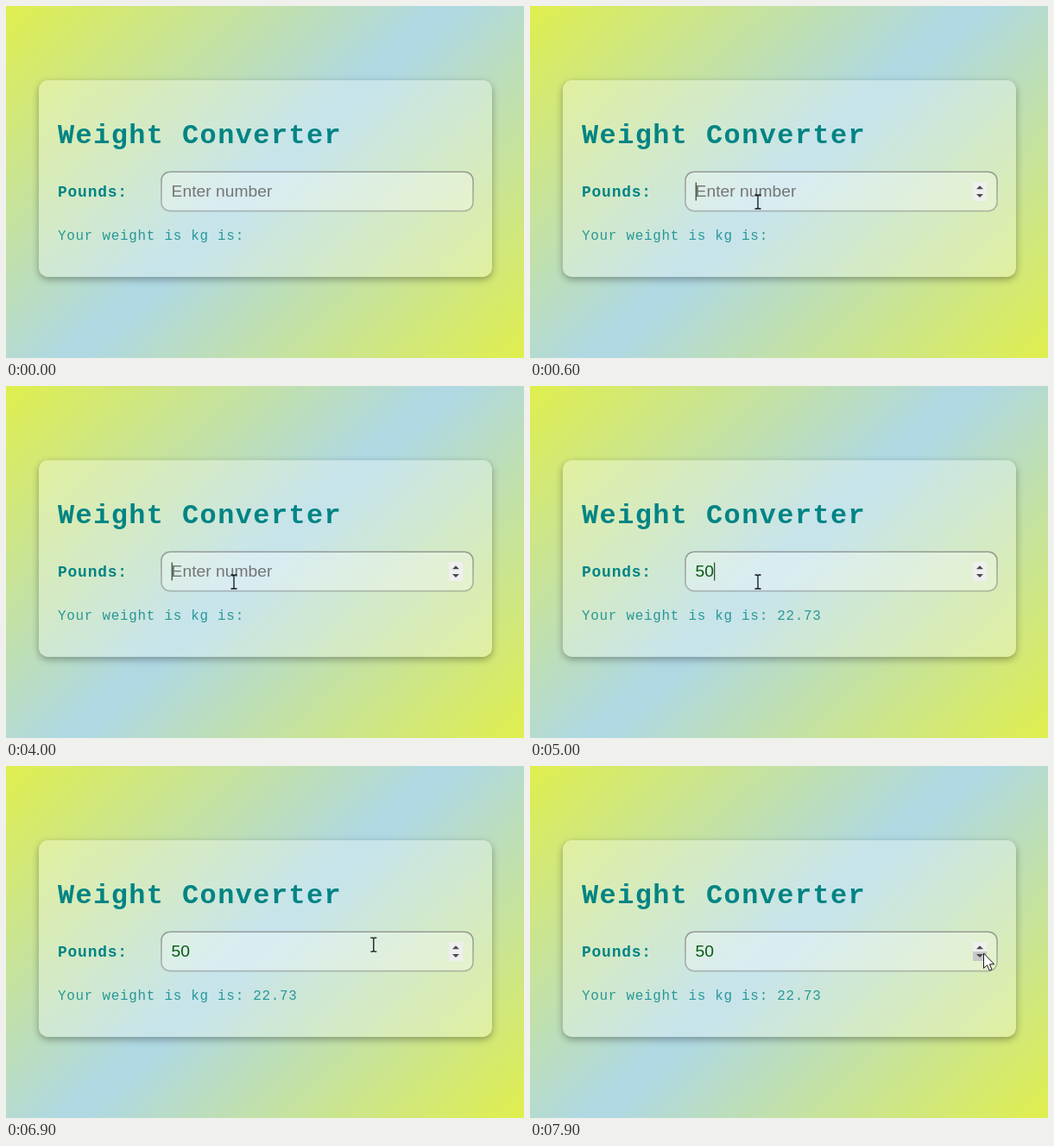
These frames come from a looping animation (600 by 408 pixels, 8 s). An HTML page:

```html
<!DOCTYPE html>
<html lang="en">
<head>
<meta charset="utf-8">
<title>Weight Converter</title>
<style>
html, body { margin: 0; width: 100%; height: 100%; overflow: hidden; }
body { position: relative; background: linear-gradient(137deg, #dfee50 1%, #afd8e2 48%, #afd8e2 51%, #dfee50 99%); }
.card {
  position: absolute; left: 38px; top: 85.5px; width: 525px; height: 228px;
  border-radius: 10.7px; background: rgba(255, 255, 255, .3);
  box-shadow: 0 3px 8px rgba(0, 0, 0, .33);
}
svg { position: absolute; left: 0; top: 0; width: 600px; height: 408px; }
text { white-space: pre; }
.mono { font-family: "Liberation Mono", "Courier New", monospace; fill: #008484; letter-spacing: .045em; }
.bold { font-weight: 700; }
.sans { font-family: "Liberation Sans", Arial, sans-serif; font-size: 19.28px; }
</style>
</head>
<body>
<div class="card"></div>
<svg viewBox="0 0 600 408">
  <linearGradient id="edge" x2="0" y2="1">
    <stop stop-color="#767676" stop-opacity=".68"/>
    <stop offset="1" stop-color="#767676" stop-opacity=".45"/>
  </linearGradient>
  <text class="mono bold" x="60" y="159" font-size="31.9">Weight Converter</text>
  <text class="mono bold" x="60" y="221" font-size="17.93">Pounds:</text>
  <text class="mono" id="result" x="60" y="270.5" font-size="15.94" opacity=".8"></text>

  <rect x="180" y="192.2" width="361" height="45.4" rx="10" fill="#fff" fill-opacity=".3"
        stroke="url(#edge)" stroke-width="1.6"/>
  <text class="sans" id="field" x="191.6" y="221"></text>
  <rect id="caret" y="204.5" width="1.1" height="21" fill="#123c12"/>

  <g id="spinner">
    <rect x="513" y="204" width="16" height="22" fill="#efefef"/>
    <rect id="down" x="513" y="215" width="16" height="11" fill="#c6c8c9"/>
    <path d="M517 212.3l4-4 4 4zM517 217.9l4 4 4-4z" fill="#484848"/>
  </g>

  <path id="arrow" d="M0 0V17.5L4 13.8L6.7 20L9.5 18.8L6.9 12.8H12.3Z"
        fill="#fff" stroke="#1a1a1a" stroke-linejoin="round"/>
  <path id="beam" d="M-3.5 -8H-1L0 -7.2L1 -8H3.5M0 -7.2V7.2M-3.5 8H-1L0 7.2L1 8H3.5"
        fill="none" stroke="#111" stroke-width="1.3"/>
</svg>
<script>
const LOOP = 8000, TICK = 100;
const $ = id => document.getElementById(id);
const show = (id, on) => $(id).setAttribute("visibility", on ? "visible" : "hidden");

const start = { x: 211, y: 400 };
const glides = [
  { from: 100, to: 600, x: 264, y: 227 },
  { from: 6200, to: 6600, x: 366, y: 201 },
  { from: 6700, to: 7200, x: 515.5, y: 210.5 },
  { from: 7300, to: 7900, x: 525.5, y: 217 }
];

// steady sideways, slowing down vertically
function pointer(t) {
  let { x, y } = start;
  for (const g of glides) {
    const k = Math.min(1, Math.max(0, (t - g.from) / (g.to - g.from)));
    x += (g.x - x) * k;
    y += (g.y - y) * (1 - (1 - k) ** 2);
  }
  return [x, y];
}

function caretOn(t) {
  if (t < 4000) return t >= 600 && t < 1100;
  return t % 1000 < 500 || t === 4900;
}

function draw(time) {
  const t = Math.floor((time % LOOP) / TICK) * TICK;
  const value = "50".slice(0, Math.max(0, (t - 4800) / TICK));
  $("field").textContent = value || "Enter number";
  $("field").setAttribute("fill", value ? "#0a5a14" : "#757575");
  $("result").textContent = "Your weight is kg is:" + (value && " " + (value / 2.2).toFixed(2));

  $("caret").setAttribute("x", 191.7 + value.length * 10.72);
  show("caret", caretOn(t));
  show("spinner", t >= 500);
  show("down", t >= 7800);

  const beam = t >= 500 && t < 7500;
  const place = `translate(${pointer(t)})`;
  $("arrow").setAttribute("transform", place);
  $("beam").setAttribute("transform", place);
  show("arrow", t >= 100 && !beam);
  show("beam", beam);
}

function frame(now) {
  draw(now);
  requestAnimationFrame(frame);
}
draw(0);
requestAnimationFrame(frame);
</script>
</body>
</html>
```
